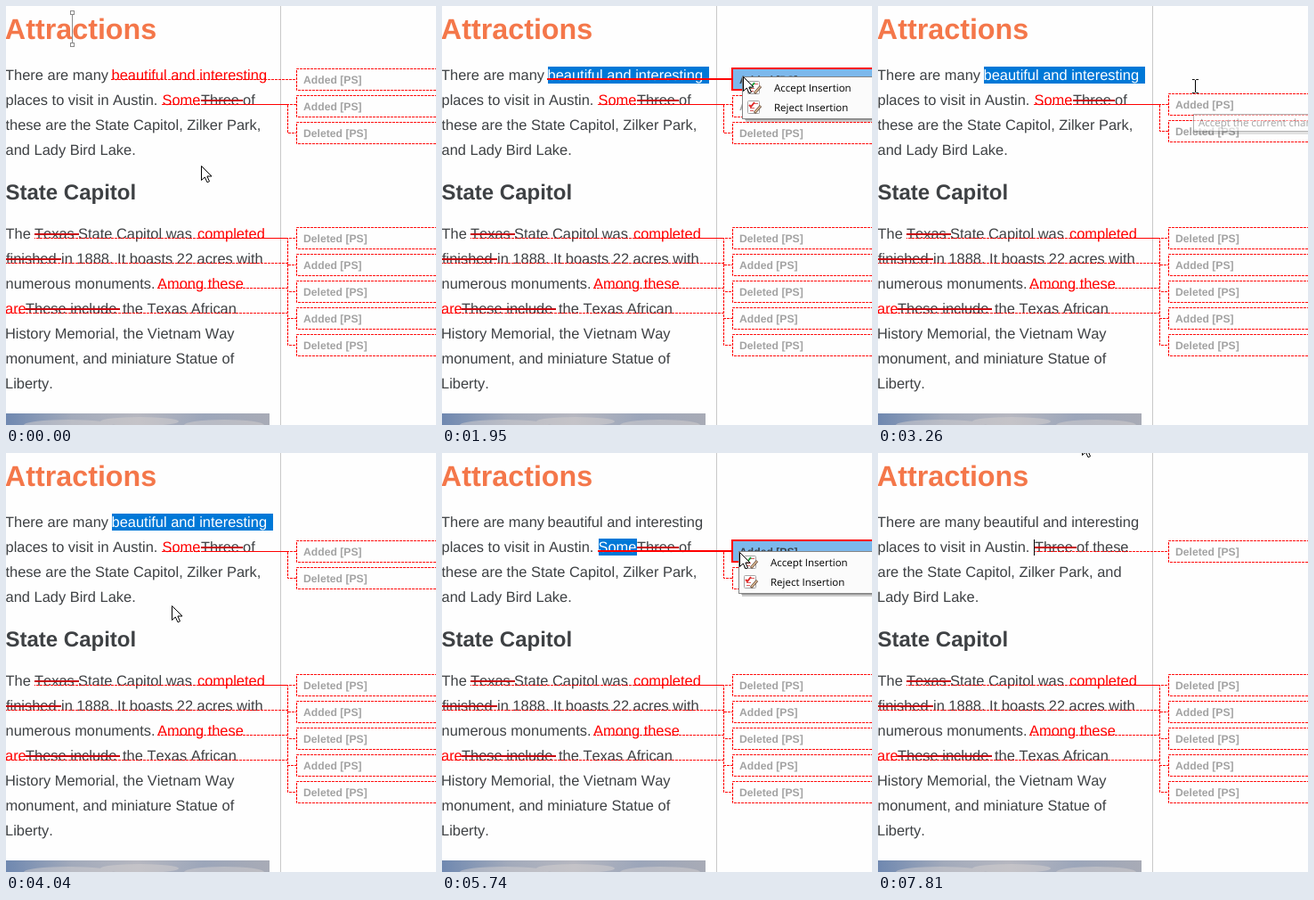
An HTML page that plays this animation: 483 by 470 pixels, repeating every 8 s.

```html
<!DOCTYPE html>
<html lang="en">
<head>
<meta charset="utf-8">
<title>Reviewing tracked changes</title>
<style>
html, body { margin: 0; width: 100%; height: 100%; overflow: hidden; background: #fefefe; }
svg { display: block; }
text { font: 16.45px "Liberation Sans", Arial, sans-serif; font-kerning: none; fill: #3e4144; text-rendering: geometricPrecision; }
.h1 { font-size: 32.3px; font-weight: bold; fill: #f4774a; }
.h2 { font-size: 24px; font-weight: bold; }
.ins { fill: #f00; }
.sel { fill: #fff; }
.note { font-size: 12.2px; font-weight: bold; fill: #a3a3a3; }
.hot { fill: #38424c; }
.ui { font: 11.5px "Open Sans", "Noto Sans", sans-serif; fill: #000; }
.tip { fill: #6c6c6c; }
</style>
</head>
<body>
<svg id="stage" width="483" height="470" viewBox="0 0 483 470"></svg>
<script>
const stage = document.getElementById("stage");
const LOOP = 8000;

// Timeline of the clicks, in ms
const SELECT1 = 1800, MENU1 = 1950, ACCEPT = 3130, SELECT2 = 5060, REJECT = 6680;

// Cursor moves: start, end, number of steps, points along the way
const moves = [
  [560, 1430, 7, [[219, 179], [338, 79]]],
  [2450, 2850, 4, [[338, 79], [355, 90]]],
  [3500, 4540, 9, [[356, 90], [168, 178], [332, 118]]],
  [4690, 4690, 1, [[332, 118], [333, 110]]],
  [5740, 5740, 1, [[333, 110], [334, 111]]],
  [5890, 6160, 3, [[334, 111], [356, 141]]],
  [6830, 7410, 5, [[356, 141], [229, 3]]],
  [7540, 7810, 3, [[229, 3], [229, -14]]]
];

function cursorAt(t) {
  let pos = moves[0][3][0];
  for (const [from, to, n, pts] of moves) {
    if (t < from) break;
    const step = to > from ? Math.floor((t - from) / (to - from) * (n - 1) + 1e-6) : 0;
    const u = Math.min(1, (step + 1) / n) * (pts.length - 1);
    const i = Math.min(Math.floor(u), pts.length - 2), f = u - i;
    pos = [0, 1].map(k => Math.round(pts[i][k] + (pts[i + 1][k] - pts[i][k]) * f));
  }
  return pos;
}

const text = (x, y, s, cls = "") => `<text x="${x}" y="${y}" class="${cls}">${s}</text>`;
const rect = (x, y, w, h, fill, more = "") =>
  `<rect x="${x}" y="${y}" width="${w}" height="${h}" fill="${fill}" ${more}/>`;
const path = (d, stroke, more = "") => `<path d="${d}" fill="none" stroke="${stroke}" ${more}/>`;
const strike = (x1, x2, y) => rect(x1, y, x2 - x1, 2, "#c80810");

const fixed =
  `<defs><linearGradient id="sky"><stop offset="0" stop-color="#6f88b0"/>
  <stop offset=".25" stop-color="#a2aabb"/><stop offset=".5" stop-color="#b6b7c0"/>
  <stop offset=".75" stop-color="#9ca6ba"/><stop offset="1" stop-color="#a8abb6"/></linearGradient>
  <clipPath id="photo"><rect y="457" width="296" height="13"/></clipPath></defs>` +
  rect(0, 0, 483, 470, "#fefefe") +
  path("M308.5 0V470", "#c8c8c8") +
  text(-1.2, 37, "Attractions", "h1") +
  text(-.5, 217, "State Capitol", "h2") +
  `<g clip-path="url(#photo)">${rect(0, 457, 296, 13, "url(#sky)")}
  <g fill="#d4d0d0" opacity=".5"><ellipse cx="70" cy="470" rx="50" ry="6"/>
  <ellipse cx="150" cy="466" rx="44" ry="5"/><ellipse cx="245" cy="470" rx="45" ry="6"/></g></g>`;

const lower =
  text(-.5, 261, "The") + text(32, 261, "Texas") + text(81, 261, "State Capitol was") +
  text(215, 261, "completed", "ins") +
  text(0, 289, "finished") + text(62, 289, "in 1888. It boasts 22 acres with") +
  text(-.5, 317, "numerous monuments.") + text(170, 317, "Among these", "ins") +
  text(-1, 345, "are", "ins") + text(22, 345, "These include") + text(131, 345, "the Texas African") +
  text(-1, 373, "History Memorial, the Vietnam Way") +
  text(-.5, 401, "monument, and miniature Statue of") +
  text(-1, 429, "Liberty.") +
  strike(32, 82, 255) + strike(0, 62, 283) + strike(22, 128, 339);

function upper(phase, selected) {
  const last = phase === 2;
  let s = "";
  if (selected === 1) s += rect(119, 68, 181, 19, "#0078d7");
  if (selected === 2) s += rect(176, 96, 43, 19, "#0078d7");
  s += text(-1, 83, "There are many") +
    text(118.5, 83, "beautiful and interesting", selected === 1 ? "sel" : phase ? "" : "ins") +
    text(-.5, 111, "places to visit in Austin.");
  if (last)
    return s + text(176, 111, "Three") + text(223, 111, "of these") + strike(176, 223, 105) +
      text(-.5, 139, "are the State Capitol, Zilker Park, and") + text(-1, 167, "Lady Bird Lake.");
  return s + text(175.5, 111, "Some", selected === 2 ? "sel" : "ins") +
    text(219, 111, "Three") + text(266, 111, "of") + strike(219, 266, 105) +
    text(-.5, 139, "these are the State Capitol, Zilker Park,") + text(-.5, 167, "and Lady Bird Lake.");
}

// One margin note with its connector: label, start x, line y, box top
function note([label, x, y, top], hot) {
  const half = hot ? 0 : .5, mid = top + 12.5, ly = y + half;
  const line = `M${x} ${ly}` + (Math.abs(mid - ly) < 4 ? "H326" : `H316.5V${mid}H326`);
  const style = offset => hot ? 'stroke-width="2"'
    : `stroke-dasharray="3 1" stroke-dashoffset="${offset}"`;
  return path(line, "#f00", style(label === "Added" ? 0 : 2)) +
    rect(326 + half, top + half, 170, 24, hot ? "#7cb8ec" : "#fefefe", 'stroke="#f00" ' + style(.5)) +
    text(334, top + 17, label + " [PS]", hot ? "note hot" : "note");
}

function notes(phase, hot) {
  const list = [];
  if (phase < 1) list.push(["Added", 118, 82, 70]);
  if (phase < 2) list.push(["Added", 175, 110, phase ? 98 : 100]);
  list.push(["Deleted", phase === 2 ? 176 : 219, 110, [130, 128, 98][phase]]);
  list.push(["Deleted", 32, 260, 248], ["Added", 215, 260, 278], ["Deleted", 0, 288, 308],
    ["Added", 170, 316, 338], ["Deleted", 0, 344, 368]);
  // The hot note is always the topmost one and lies over the others
  return list.map((n, i) => note(n, hot && i === 0)).reverse().join("");
}

// Sheet with red lines, a coloured mark and a pencil
const icon = (x, y, color) => `<g transform="translate(${x} ${y})">` +
  rect(1.5, .5, 13, 14, "#fff", 'stroke="#a4a4a4" rx="1"') +
  path("M4 8.5h5M4 11.5h4M9 3.5h4", "#d86060") +
  path("M3 5l2 2 4-5", color, 'stroke-width="2"') +
  path("M16 6L9 14", "#6a5040", 'stroke-width="3"') +
  path("M15.6 6.4L9.6 13.2", "#e8c49a", 'stroke-width="1.4"') + "</g>";

function menu(x, y, cy) {
  const dy = cy - y, row = dy <= 2 ? -1 : dy <= 24 ? 0 : 1;
  let s = rect(x + 4, y + 4, 160, 47, "#000", 'opacity=".2"') +
    rect(x + 3, y + 3, 160, 46, "#000", 'opacity=".25"') +
    rect(x + .5, y + .5, 160, 47, "#fbfbfb", 'stroke="#858585"');
  if (row >= 0)
    s += rect(x + 2.5, y + 2.5 + row * 22, 160, 21, "#b5d7f3", 'stroke="#2c7fc4"');
  return s + icon(x + 5, y + 5, "#18a038") + icon(x + 5, y + 27, "#e02828") +
    text(x + 36, y + 17, "Accept Insertion", "ui") +
    text(x + 36, y + 39, "Reject Insertion", "ui");
}

const tip = (x, y, verb, opacity) => `<g opacity="${opacity}">` +
  rect(x + 3, y + 3, 160, 20, "#000", 'opacity=".2"') +
  rect(x + .5, y + .5, 160, 19, "#fff", 'stroke="#808080"') +
  text(x + 6, y + 14, verb + " the current change", "ui tip") + "</g>";

const arrow = (x, y) => `<path transform="translate(${x + .5} ${y + .5})"
  d="M0 0V16L3.8 12.5 6.5 18.3 9 17.2 6.4 11.5H11.5Z" fill="#fff" stroke="#000"/>`;
const beam = (x, y) => path(`M${x - 3} ${y - 7.5}h2.5l1 1 1-1h2.5M${x - 3} ${y + 7.5}h2.5l1-1 1 1h2.5M${x + .5} ${y - 7}v14`, "#000");

const anchor = path("M74.5 10V42", "#8a8a8a") +
  rect(72.5, 5.5, 4, 4, "#fff", 'stroke="#8a8a8a"') +
  rect(72.5, 41.5, 4, 4, "#fff", 'stroke="#8a8a8a"');

function scene(t) {
  const within = (a, b) => t >= a && t < b;
  const [x, y] = cursorAt(t);
  const phase = t < ACCEPT ? 0 : t < REJECT ? 1 : 2;
  const selected = within(SELECT1, SELECT2) ? 1 : within(SELECT2, REJECT) ? 2 : 0;
  const hot = within(1430, ACCEPT) || within(4690, REJECT);

  let s = fixed + upper(phase, selected) + lower + notes(phase, hot);
  if (t < SELECT1) s += anchor;
  if (phase === 2 && !within(7540, 7810)) s += rect(175, 97, 1, 18, "#000");
  if (within(MENU1, ACCEPT)) s += menu(337, 79, y);
  if (within(SELECT2, REJECT)) s += menu(333, 110, y);
  if (within(2990, 3380)) s += tip(354, 121, "Accept", t < ACCEPT ? 1 : .6);
  if (within(6440, 6830)) s += tip(356, 173, "Reject", within(6560, REJECT) ? 1 : .6);
  return s + (within(ACCEPT, 3500) ? beam(356, 90) : arrow(x, y));
}

let shown = "";
function frame() {
  const next = scene(performance.now() % LOOP);
  if (next !== shown) stage.innerHTML = shown = next;
  requestAnimationFrame(frame);
}
frame();
</script>
</body>
</html>
```
